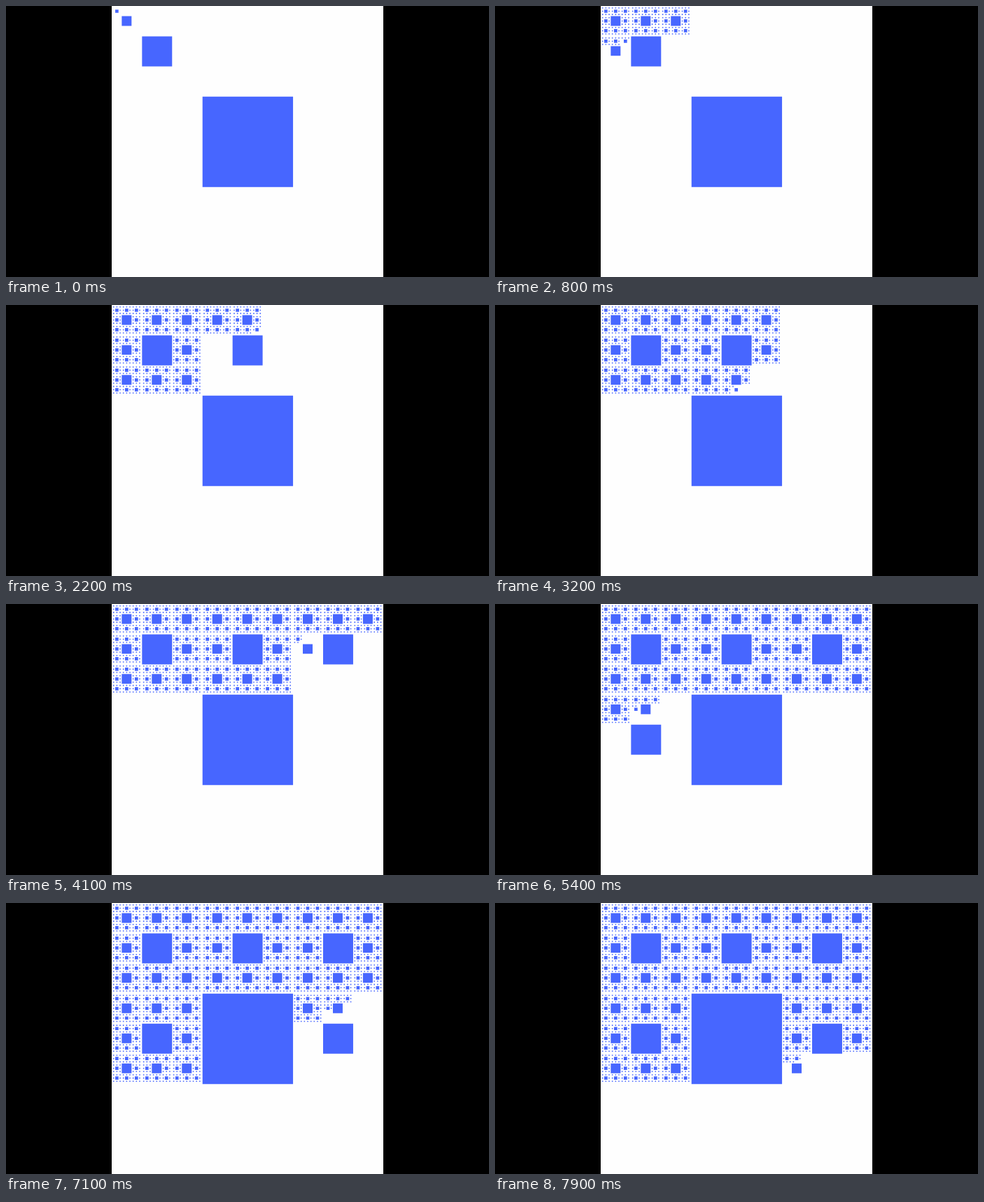
An HTML page that plays this animation: 690x388 px, repeating every 8 s.

```html
<!DOCTYPE html>
<html lang="en">
<head>
<meta charset="utf-8">
<title>Sierpinski carpet</title>
<style>
  html, body { margin: 0; width: 100%; height: 100%; overflow: hidden; background: #000; }
  svg { display: block; width: 100vw; height: 100vh; }
</style>
</head>
<body>
<svg viewBox="0 0 690 388" preserveAspectRatio="none">
  <rect width="690" height="388" fill="#000"/>
  <rect x="151" width="388" height="388" fill="#fefefe"/>
  <path id="carpet" fill="#4766ff"/>
</svg>
<script>
const LOOP = 8000, STEP = 100, DEPTH = 5, SIDE = 750;
const carpet = document.getElementById('carpet');
carpet.setAttribute('transform', `translate(151.4 .5) scale(${388 / SIDE})`);
const squares = [];

// Middle square first, then the eight surrounding cells row by row.
// Whole-number thirds leave a thin gap between neighbouring blocks.
function divide(x, y, size, depth) {
  if (!depth) return;
  const third = Math.floor(size / 3);
  squares.push(`M${x + third} ${y + third}h${third}v${third}h${-third}z`);
  for (let row = 0; row < 3; row++)
    for (let col = 0; col < 3; col++)
      if (row !== 1 || col !== 1)
        divide(x + col * third, y + row * third, third, depth - 1);
}
divide(0, 0, SIDE, DEPTH);

// [time in ms, squares drawn]
const pace = [[0, 4], [800, 244], [2200, 729], [4100, 1400], [5400, 1861], [6400, 2209], [7900, 2724]];

function countAt(t) {
  const i = Math.max(1, pace.findIndex(([time]) => time >= t));
  const [t0, n0] = pace[i - 1], [t1, n1] = pace[i];
  return Math.round(n0 + (n1 - n0) * (t - t0) / (t1 - t0));
}

let shown = -1;
function render(ms) {
  const count = countAt(Math.floor(ms % LOOP / STEP) * STEP);
  if (count === shown) return;
  shown = count;
  carpet.setAttribute('d', squares.slice(0, count).join(''));
}

let start;
function tick(now) {
  start ??= now;
  render(now - start);
  requestAnimationFrame(tick);
}
render(0);
requestAnimationFrame(tick);
</script>
</body>
</html>
```
